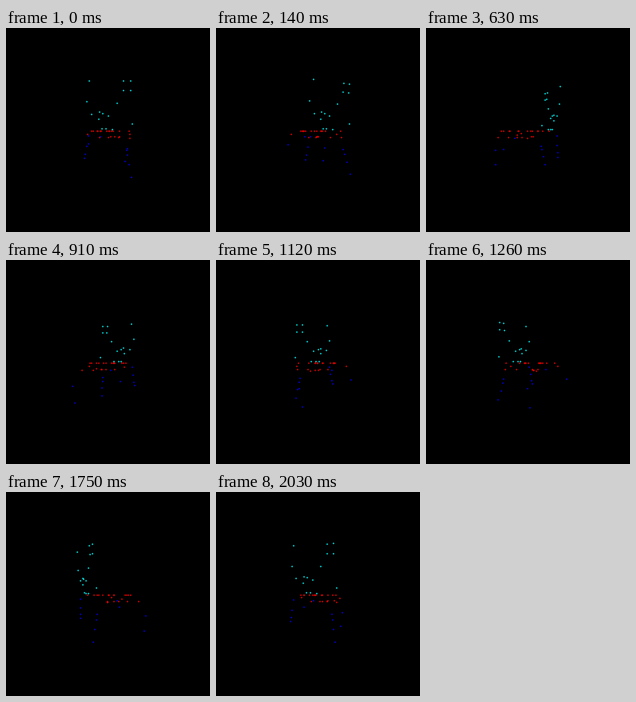
Animation, 256 px wide and 256 px high, one loop 2.1 s. Source, as a matplotlib script:

```python
import numpy as np
import matplotlib.pyplot as plt
from matplotlib.animation import FuncAnimation

SIZE, DPI = 256, 100
FRAMES, INTERVAL = 30, 70
CENTER = SIZE / 2
CAMERA = 225          # distance from the eye to the turning axis
DOT = 1.8             # dot diameter in pixels


def stroke(count, start, end):
    """Dots on a line, bunched towards its start."""
    t = np.linspace(0, 1, count)[:, None] ** 1.5
    return np.array(start) * (1 - t) + np.array(end) * t


def front(flat):
    """Stand (x, y) dots upright at the front, leaning out with height."""
    x, y = flat.T
    return np.column_stack([x, y, 29 - 0.08 * y])


def layer(y, *strokes):
    """Lay (x, z) strokes flat at height y."""
    x, z = np.vstack(strokes).T
    return np.column_stack([x, np.full_like(x, y), z])


def torso():
    corners = np.pi / 4 + np.arange(4) * np.pi / 2
    hand = np.column_stack([20 + 5 * np.cos(corners), -48 + 7 * np.sin(corners)])
    return front(np.vstack([
        hand,
        stroke(2, (-20.5, -53), (-23.6, -31)),    # raised arm
        stroke(2, (-18.5, -17.5), (-10.4, -12)),  # ribs
        stroke(2, (9.5, -29.5), (26, -7)),        # shoulder to elbow
        stroke(3, (-9.5, -19.5), (0, -15.5)),     # chest
        stroke(3, (-7, -1.5), (4.4, -1)),         # waist
    ]))


def body():
    back = layer(
        1,
        stroke(3, (7, -30), (-11, -15)),
        stroke(3, (-12, 23), (24, 14)),
        stroke(3, (-2, 12), (15, -20)),
        stroke(4, (-21, 5), (-11, -36)),
    )
    flanks = layer(5, stroke(2, (-29, -22), (27, -2)))
    belly = layer(
        9,
        stroke(4, (0, -8), (16, -36)),
        stroke(3, (25, 15), (-11, -5)),
    )
    return np.vstack([back, flanks, belly])


def legs():
    return np.vstack([
        stroke(4, (20.5, 22, 26), (25, 50, 33)),
        stroke(4, (-26.5, 31, 27), (-22, 6.5, 29)),
        stroke(2, (27.5, 26.6, -37), (24.5, 45.5, -37)),
        stroke(2, (-11.4, 9, -20), (-29, 19.5, -36.5)),
    ])


def project(points, angle):
    """Turn the points about the vertical axis and view them in perspective."""
    x, y, z = points.T
    c, s = np.cos(angle), np.sin(angle)
    scale = CAMERA / (CAMERA - (z * c - x * s))
    return CENTER + np.column_stack([(x * c + z * s) * scale, y * scale])


fig = plt.figure(figsize=(SIZE / DPI, SIZE / DPI), dpi=DPI, facecolor="black")
ax = fig.add_axes([0, 0, 1, 1])
ax.set_xlim(0, SIZE)
ax.set_ylim(SIZE, 0)
ax.axis("off")


def add_group(points, color):
    dots = ax.scatter([], [], s=(DOT * 72 / DPI) ** 2, c=color, linewidths=0)
    dots.set_snap(False)
    return dots, points


groups = [
    add_group(legs(), "#0000ff"),
    add_group(body(), "#ff0000"),
    add_group(torso(), "#00ffff"),
]


def draw(frame):
    angle = 2 * np.pi * frame / FRAMES
    for dots, points in groups:
        dots.set_offsets(project(points, angle))
    return [dots for dots, _ in groups]


anim = FuncAnimation(fig, draw, frames=FRAMES, interval=INTERVAL, repeat=True)
plt.show()
```
